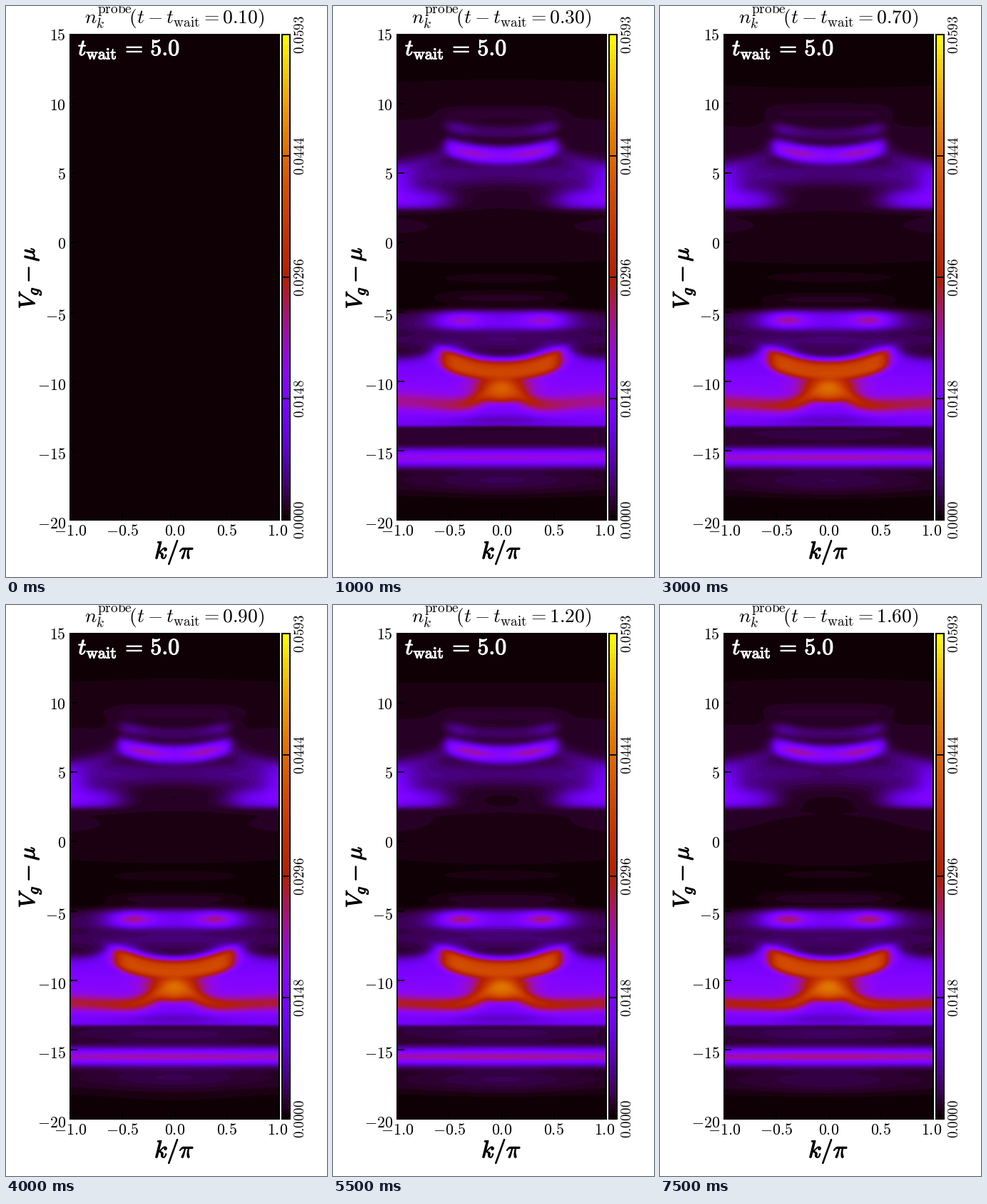
Animation, 450 px wide and 800 px high, one loop 8 s. Source, as a matplotlib script:

```python
import numpy as np
import matplotlib.pyplot as plt
from matplotlib.animation import FuncAnimation
from matplotlib.patches import Rectangle
from matplotlib.patheffects import withStroke

W, H, DPI = 450, 800, 100
PT = 72 / DPI                      # points per pixel
FRAMES, STEP = 16, 500
L, R, TOP, BOT = 90, 383, 40, 720  # heat map box in pixels
LEVELS = 100

plt.rcParams["mathtext.fontset"] = "cm"
plt.rcParams["font.family"] = "DejaVu Serif"


def gauss(u, s):
    return np.exp(-0.5 * (u / s) ** 2)


def flat(u, s, p=4):
    return np.exp(-np.abs(u / s) ** p)


def rise(u, w):
    return 1 / (1 + np.exp(-np.clip(u / w, -60, 60)))


k = np.linspace(-1, 1, R - L)[None, :]
y = np.linspace(15, -20, BOT - TOP)[:, None]
a = np.abs(k)


def background(n, q):
    z = 0.003 + 0.011 * rise(y + 1.7 - 0.3 * k**2, 0.1) * rise(11.6 - y, 0.3)
    z = z + 0.014 * gauss(y - 5.8, 2.1)
    z += 0.009 * a * gauss(y - 1.2, 0.5)
    z += 0.010 * gauss(y + 2.5, 0.3) * gauss(k, 0.5)
    z += 0.022 * gauss(y + 4.0 + 0.15 * q, 0.35) * flat(k, 0.65)
    z += (0.045 + 0.025 * gauss(k, 0.5)) * gauss(y + 7.0, 0.7)
    z += (0.030 + 0.030 * q * gauss(k, 0.6)) * gauss(y + 13.8, 0.75)
    z += (0.022 + 0.025 * gauss(k, 0.5)) * gauss(y + 17.1, 0.75)
    z += 0.003 * np.cos(y * (2 + 0.08 * n)) * gauss(k, 0.7)
    return z


def upper_bands(q):
    z = 0.065 * gauss(y - 4.9, 0.6) * (1 - 0.3 * gauss(k, 0.3))
    z += 0.045 * gauss(y - 5.3 - 2.2 * (1 - a), 0.4) * rise(a - 0.55, 0.05)

    u = y - 6.3 - 2.2 * np.minimum(a, 0.52) ** 2
    edge = rise(0.525 - a, 0.03)
    peak = 0.06 + (0.08 + 0.04 * q) * gauss(a - 0.28, 0.13)
    z += edge * (0.18 * flat(u, 0.66, 3) + peak * gauss(u, 0.28))

    u = y - 8.0 - 1.6 * np.minimum(a, 0.55) ** 2 + 0.25 * q
    edge = rise(0.53 - a, 0.04)
    z += edge * (0.045 + 0.035 * gauss(a - 0.44, 0.1)) * gauss(u, 0.33)
    z += 0.016 * gauss(y - 9.4 + 0.2 * q, 0.35) * rise(0.55 - a, 0.05)

    lobe = 0.20 * gauss(y - 3.05, 0.6) * rise(a - 0.58, 0.09)
    lobe += 0.16 * gauss(y - 4.2, 0.7) * rise(a - 0.9, 0.06)
    return z + lobe * rise(y - 2.4, 0.12)


def main_band(q):
    top = -8.45 + 0.85 * gauss(a - 0.5, 0.16)
    body = 0.2 * rise(top - y, 0.2) * rise(y + 13.25, 0.06)
    body += 0.07 * gauss(y + 10.6, 1.0)
    body -= 0.09 * gauss(k, 0.42) * gauss(y + 12.85, 0.32)

    arm = 0.41 + 0.03 * q + 0.03 * gauss(a - 0.48, 0.1)
    arm = arm * flat(y + 9.25 - 0.7 * (a / 0.5) ** 2, 0.8, 3.5)
    arm = arm * rise(0.58 - a, 0.04)
    dip = -11.85 + 1.35 * np.exp(-((a / 0.25) ** 2)) + 0.1 * a**4
    dip = dip + 0.3 * (1 - q) * rise(a - 0.6, 0.1)
    foot = 0.13 + 0.13 * q + (0.15 - 0.06 * q) * gauss(a, 0.35)
    foot = foot * gauss(y - dip, 0.4 + 0.13 * gauss(a, 0.2) + 0.15 * (1 - q) * a)
    core = (0.4 + 0.05 * q) * gauss(a, 0.18) * flat(y + 10.6, 0.95)
    return body + np.cbrt(arm**3 + foot**3 + core**3)


def lower_lines(q):
    u = y + 5.6
    z = (0.04 + 0.15 * flat(a, 0.68)) * flat(u, 0.7, 3)
    z = z + (0.15 + 0.1 * q) * gauss(a - 0.4, 0.13) * gauss(u, 0.33)
    u = y + 15.53
    z += 0.21 * flat(u, 0.7, 3)
    z += (0.08 + 0.09 * q + 0.02 * gauss(k, 0.6)) * gauss(u, 0.25)
    return z


def field(n):
    if n == 0:
        z = np.zeros((BOT - TOP, R - L))
    else:
        q = 1 - np.exp(-(n - 1) / 6)
        z = background(n, q) + upper_bands(q) + main_band(q) + lower_lines(q)
    return banded(z)


def banded(z):
    return (np.floor(np.clip(z, 0, 0.999) * LEVELS) + 0.5) / LEVELS


fig = plt.figure(figsize=(W / DPI, H / DPI), dpi=DPI, facecolor="white")
ax = fig.add_axes([0, 0, 1, 1])
ax.axis("off")


def heat(z, x0, x1):
    return ax.imshow(z, cmap="gnuplot", vmin=0, vmax=1, aspect="auto",
                     extent=(x0, x1, BOT, TOP), interpolation="nearest")


def frame(x0, x1):
    ax.add_patch(Rectangle((x0, TOP), x1 - x0, BOT - TOP, fill=False,
                           ec="black", lw=2 * PT, zorder=4))


def line(xs, ys):
    ax.plot(xs, ys, color="black", lw=1.8 * PT, zorder=3, solid_capstyle="butt")


def label(x, yy, s, size, ha="center", rot=0, color="black", bold=0):
    fx = [withStroke(linewidth=bold * PT, foreground=color)] if bold else None
    return ax.text(x, yy, f"${s}$", fontsize=size * PT, ha=ha, va="baseline",
                   rotation=rot, rotation_mode="anchor", color=color,
                   path_effects=fx, zorder=5)


image = heat(field(0), L, R)
heat(banded(np.linspace(1, 0, BOT - TOP)[:, None]), 387, 398)
frame(L, R)
frame(387, 398)

for v in range(-20, 16, 5):
    py = TOP + (15 - v) * (BOT - TOP) / 35
    line([L, L + 10], [py, py])
    label(84, py + (12 if v < 0 else 8.5), v, 22, ha="right")

for v in (-1, -0.5, 0, 0.5, 1):
    px = L + (v + 1) * (R - L) / 2
    line([px, px], [BOT - 10, BOT])
    label(px - (2 if v == 1 else 0), 742, f"{v:.1f}", 22)

for i, s in enumerate(("0.0000", "0.0148", "0.0296", "0.0444", "0.0593")):
    py = BOT - i * (BOT - TOP) / 4
    line([387, 398], [py, py])
    label(418, py, s, 19, rot=90)

label(236, 774, r"k/\pi", 34, bold=1.2)
label(40, 381, r"V_g-\mu", 31.5, rot=90, bold=1.2)
label(101, 69, r"t_{\mathrm{wait}}\,=\,5.0", 32, ha="left", color="white", bold=1.1)
title = label(236, 25, "", 27.5)

ax.set_xlim(0, W)
ax.set_ylim(H, 0)


def update(n):
    image.set_data(field(n))
    title.set_text(r"$n_k^{\mathrm{probe}}\!(t-t_{\mathrm{wait}}=%.2f)$" % (0.1 * (n + 1)))
    return image, title


anim = FuncAnimation(fig, update, frames=FRAMES, interval=STEP,
                     repeat=True, repeat_delay=0, blit=False)
plt.show()
```
